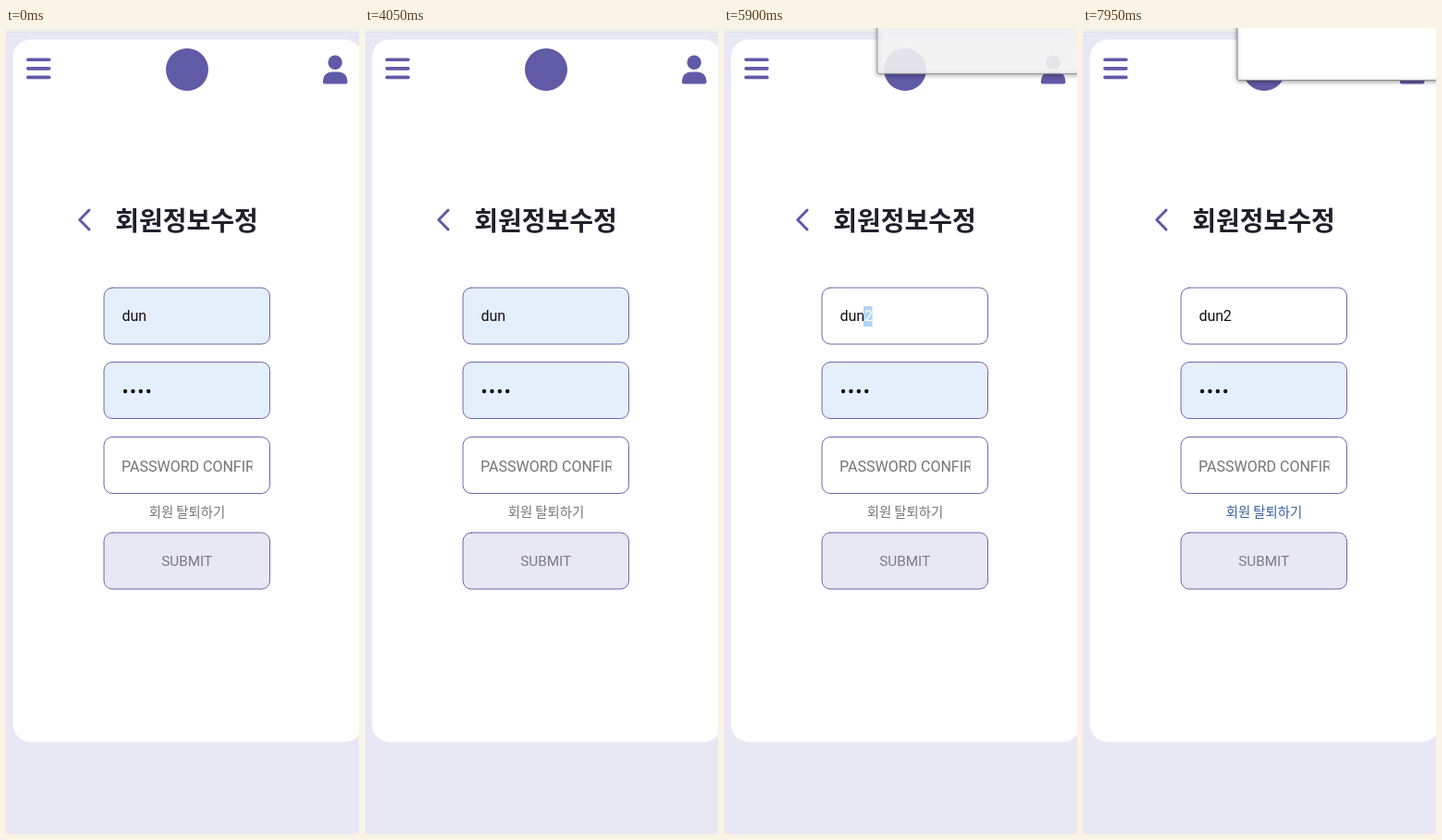
An HTML page with a canvas for the animation above (8000 ms loop, 382 px wide and 872 px high).

```html
<!DOCTYPE html>
<html lang="ko">
<head>
<meta charset="utf-8">
<title>회원정보수정</title>
<style>
html, body { margin: 0; width: 100%; height: 100%; overflow: hidden; background: #e8e7f4; }
canvas { display: block; width: 382px; height: 872px; }
</style>
</head>
<body>
<canvas id="stage"></canvas>
<script>
const W = 382, H = 872, LOOP = 8000;
const PURPLE = '#605aa7', LAVENDER = '#e8e7f4', AUTOFILL = '#e5effc';
const LATIN = 'Roboto, sans-serif';
const KOREAN = '"Noto Sans CJK KR", "Noto Sans CJK", sans-serif';
const USER = 'dun';

// Moments of the interaction, in ms
const FOCUS = 4600, MENU = 4700, TYPED = 5450, SELECT = 5750, DESELECT = 6500, HOVER = 6650;
const DIALOGS = [[5781, 6450], [6799, Infinity]];

const canvas = document.getElementById('stage');
const ctx = canvas.getContext('2d');
const scale = window.devicePixelRatio || 1;
canvas.width = W * scale;
canvas.height = H * scale;

const between = (t, a, b) => t >= a && t < b;
const clamp = v => Math.max(0, Math.min(1, v));
const smooth = v => v * v * (3 - 2 * v);

function rect(x, y, w, h, color) {
  ctx.fillStyle = color;
  ctx.fillRect(x, y, w, h);
}

function round(x, y, w, h, r, fill, stroke) {
  ctx.beginPath();
  ctx.roundRect(x, y, w, h, r);
  ctx.fillStyle = fill;
  ctx.fill();
  if (stroke) {
    ctx.strokeStyle = stroke;
    ctx.lineWidth = 1;
    ctx.stroke();
  }
}

function circle(x, y, r, color) {
  ctx.beginPath();
  ctx.arc(x, y, r, 0, Math.PI * 2);
  ctx.fillStyle = color;
  ctx.fill();
}

function polygon(points, color) {
  ctx.beginPath();
  points.forEach(([x, y]) => ctx.lineTo(x, y));
  ctx.fillStyle = color;
  ctx.fill();
}

function text(str, x, y, font, color, align = 'left') {
  ctx.font = font;
  ctx.textAlign = align;
  ctx.fillStyle = color;
  ctx.fillText(str, x, y);
}

function setShadow(color, blur, y) {
  ctx.shadowColor = color;
  ctx.shadowBlur = blur * scale;
  ctx.shadowOffsetY = y * scale;
}

function drawPage() {
  rect(0, 0, W, H, LAVENDER);
  rect(0, 0, W, 4, '#f0f0ef');
  rect(0, 4, W, 1, '#e2e2e6');
  round(7.5, 12.5, 378, 760, 19, '#fff');
}

function drawHeader() {
  for (const y of [32.4, 42, 51.6]) round(22, y, 26.5, 3.7, 1.8, PURPLE);
  circle(196, 45, 23, PURPLE);
  circle(356.2, 37.3, 7.7, PURPLE);
  round(343, 47.5, 26.5, 13, [9.5, 9.5, 2, 2], PURPLE);
}

function drawTitle() {
  ctx.beginPath();
  ctx.moveTo(90, 197);
  ctx.lineTo(79.7, 207.5);
  ctx.lineTo(90, 218);
  ctx.strokeStyle = PURPLE;
  ctx.lineWidth = 3;
  ctx.lineCap = ctx.lineJoin = 'round';
  ctx.stroke();
  text('회원정보수정', 195.5, 218.5, '700 28px ' + KOREAN, '#20202b', 'center');
}

const box = (y, fill) => round(106, y, 179.5, 61, 9, fill, '#6b67ad');

function drawName(t) {
  const font = '16px ' + LATIN, typed = t >= TYPED;
  box(281, typed ? '#fff' : AUTOFILL);
  text(USER, 125.5, 317, font, '#111');
  const end = 125.5 + ctx.measureText(USER).width;
  const selected = between(t, SELECT, DESELECT);
  if (selected) rect(151, 301, 9.5, 22, '#add5f3');
  if (typed) text('2', end - 0.5, 317, font, selected ? '#fff' : '#111');
  if (between(t, FOCUS, SELECT)) rect(typed ? 160 : 151, 303, 1, 18, '#111');
}

function drawForm(t) {
  drawName(t);
  box(361.5, AUTOFILL);
  for (let i = 0; i < 4; i++) circle(129 + i * 8.4, 393, 2.2, '#111');

  box(442.5, '#fff');
  ctx.save();
  ctx.beginPath();
  ctx.rect(125, 450, 141.5, 45);
  ctx.clip();
  text('PASSWORD CONFIRM', 125, 480, '16px ' + LATIN, '#757575');
  ctx.restore();

  text('회원 탈퇴하기', 196, 528.5, '14.4px ' + KOREAN, t >= HOVER ? '#365fa9' : '#777', 'center');
  box(546, LAVENDER);
  text('SUBMIT', 195.7, 582, '15.3px ' + LATIN, '#7d7b86', 'center');
}

function drawMenu() {
  ctx.save();
  setShadow('rgba(0,0,0,.35)', 5, 1);
  polygon([[198, 371], [207, 362], [216, 371]], '#fff');
  round(185, 370, 180.5, 111, 3, '#fff');
  ctx.restore();
  polygon([[198, 371], [207, 362], [216, 371]], '#fff');
  circle(205, 403, 7, PURPLE);
  text(USER, 225, 397, '14px ' + LATIN, '#222');
  for (let i = 0; i < 4; i++) circle(227.7 + i * 5.4, 415.5, 1.8, '#555');
  rect(185, 436, 180.5, 1, '#d6d6d6');
  circle(205, 459, 6.5, '#5f6368');
  text('비밀번호 관리...', 225, 464, '14px ' + KOREAN, '#5f6368');
  circle(343, 459.5, 5, '#3f75c8');
}

// The browser dialog fades in while it slides down over the top edge
function drawDialog(t) {
  const shown = DIALOGS.find(([start, end]) => between(t, start, end));
  if (!shown) return;
  const age = t - shown[0];
  const slide = smooth(clamp(age / 400));
  const left = 165 + slide * 1.5, bottom = 48 + slide * 9;
  ctx.save();
  ctx.globalAlpha = clamp(age / 140);
  setShadow('rgba(0,0,0,.4)', 5, 1);
  round(left + 0.5, -20.5, 300, bottom + 20, 2, '#fff', '#8d8d8d');
  ctx.restore();
}

function draw(t) {
  ctx.setTransform(scale, 0, 0, scale, 0, 0);
  drawPage();
  drawHeader();
  drawTitle();
  drawForm(t);
  if (between(t, MENU, TYPED)) drawMenu();
  drawDialog(t);
}

const begin = performance.now();
function frame() {
  draw((performance.now() - begin) % LOOP);
  requestAnimationFrame(frame);
}
frame();
</script>
</body>
</html>
```
